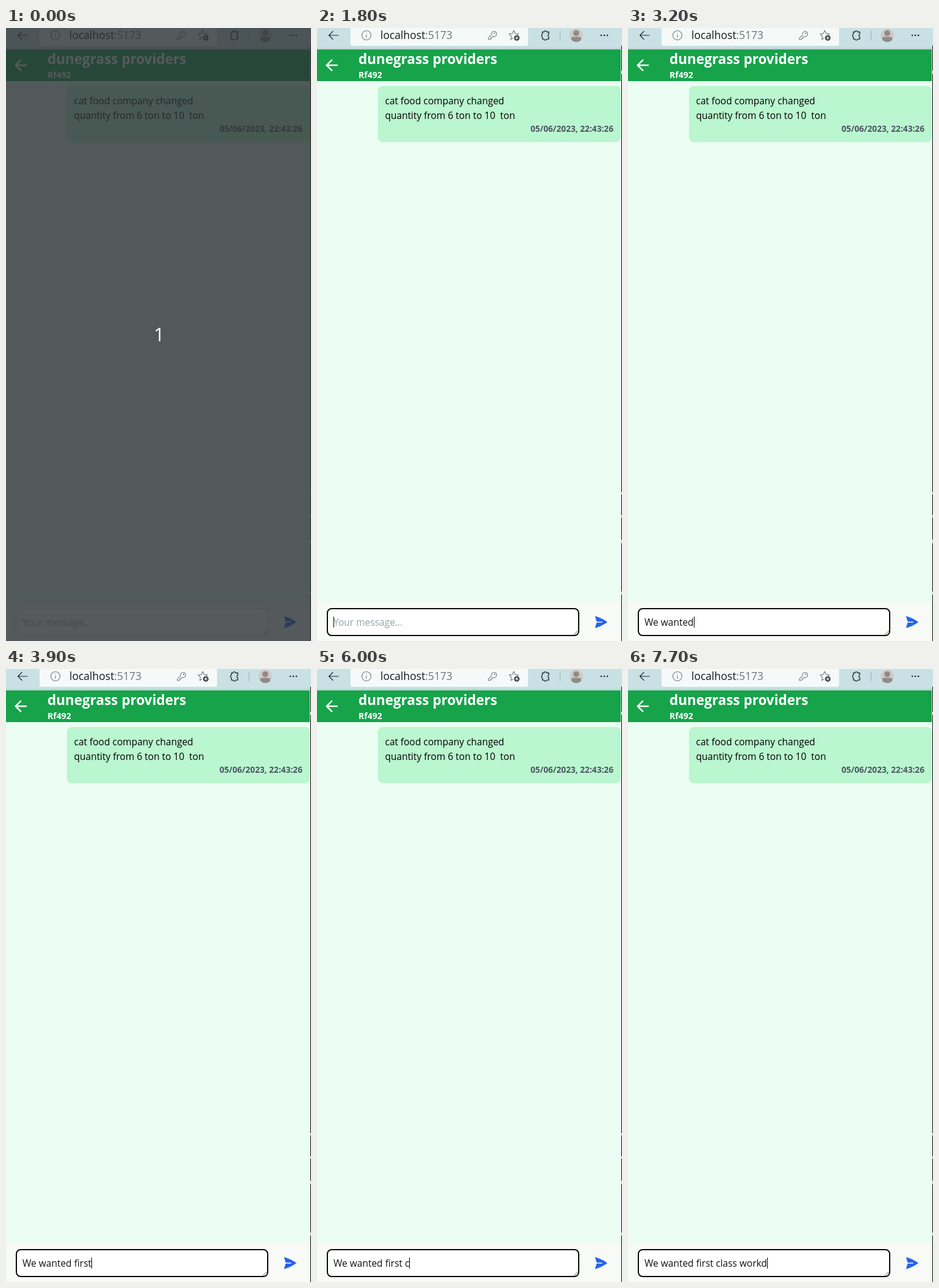
An HTML page for the animation above (8 s loop, 500x1004 px).

```html
<!DOCTYPE html>
<html lang="en">
<head>
<meta charset="utf-8">
<title>Chat</title>
<style>
  html, body { margin: 0; width: 100%; height: 100%; overflow: hidden; }
  svg { display: block; width: 500px; height: 1004px; }
  text { font: 15.5px "Open Sans", "Noto Sans", sans-serif; white-space: pre; }
  .url { font-size: 17.5px; }
  .title { font-size: 22.5px; font-weight: 700; }
  .code { font-size: 14px; font-weight: 700; }
  .date { font-size: 13.7px; font-weight: 700; }
  .count { font-size: 31px; text-anchor: middle; }
  .line { fill: none; stroke-linecap: round; stroke-linejoin: round; }
</style>
</head>
<body>
<svg viewBox="0 0 500 1004">
  <rect width="500" height="1004" fill="#ecfdf3"/>

  <!-- browser bar -->
  <rect width="500" height="35" fill="#c9e1e4"/>
  <path d="M55 0H346V26a3 3 0 0 1-3 3H58a3 3 0 0 1-3-3Z" fill="#f5faf9"/>
  <rect y="33" width="500" height="1" fill="#a9bcc0"/>
  <rect y="34" width="500" height="1" fill="#e3eeee"/>
  <path class="line" d="M35 12H19.5M26 5.5L19.5 12l6.5 6.5" stroke="#20282a" stroke-width="1.2"/>
  <g class="line" stroke="#747c7e" stroke-width="1.1">
    <circle cx="81" cy="12" r="7.5"/>
    <path d="M81 11v4.5M81 8.3v.2"/>
    <path d="M286.2 11.2a4.3 4.3 0 1 1 2.8 2.7L286.5 15.2V17H284.5V18.8H281V16.3Z"/>
    <circle cx="291" cy="8.7" r=".6"/>
    <path d="M321 16.8l-3.3 2 1-5.3-3.7-3.7 5.2-.7L322.5 4l2.3 5.1 5.4.7-2 2"/>
  </g>
  <text class="url" x="104" y="18" fill="#151b1c">localhost<tspan fill="#6f7778">:5173</tspan></text>
  <circle cx="327.5" cy="16.3" r="4.6" fill="#4a5052"/>
  <path d="M325 16.3h5M327.5 13.8v5" stroke="#fff"/>
  <path class="line" d="M369.5 6.5h2.5a2.3 2.3 0 0 1 4.5 0h3.5v3.7a2 2 0 0 0 0 3.9v4h-3.5a2.3 2.3 0 0 1-4.5 0h-2.5v-3.7a2.2 2.2 0 0 1 0-4.2Z" stroke="#20282a" stroke-width="1.3"/>
  <path d="M398.5 4V20" stroke="#9fb1b4"/>
  <circle cx="425" cy="12" r="11" fill="#cfcac6"/>
  <circle cx="425" cy="8.5" r="4.8" fill="#918b87"/>
  <path d="M417 19.5v-2.5q0-2.5 2.5-2.5h11q2.5 0 2.5 2.5v2.5a11 11 0 0 1-16 0Z" fill="#918b87"/>
  <g fill="#20282a">
    <circle cx="466" cy="12" r="1.3"/><circle cx="471" cy="12" r="1.3"/><circle cx="476" cy="12" r="1.3"/>
  </g>

  <!-- chat header -->
  <rect y="35" width="499" height="52" fill="#16a34a"/>
  <g fill="#fff">
    <path transform="translate(9 46) scale(1.25)" d="M20 11H7.83l5.59-5.59L12 4l-8 8 8 8 1.41-1.41L7.83 13H20Z"/>
    <text class="title" x="68" y="59">dunegrass providers</text>
    <text class="code" x="68" y="82">Rf492</text>
  </g>

  <!-- message -->
  <rect x="100" y="95" width="398" height="92" rx="8" fill="#baf6cf"/>
  <text x="111.5" y="125">cat food company changed</text>
  <text x="111.5" y="149">quantity from 6 ton to 10  ton</text>
  <text class="date" x="486" y="170" text-anchor="end" fill="#4b5563">05/06/2023, 22:43:26</text>

  <!-- composer -->
  <rect y="941" width="499" height="63" fill="#f8faf8"/>
  <rect id="box" fill="#fff"/>
  <path class="line" d="M421.5 993.5l7-7M426 993.5l2.5-2.5" stroke="#555" stroke-width=".9"/>
  <text id="hint" x="27" y="979" fill="#94a3a8">Your message...</text>
  <text id="typed" x="27" y="979" fill="#111"></text>
  <rect id="caret" y="964" width="1" height="18"/>
  <path transform="translate(453.5 961)" fill="#2563eb" d="M3.5 2.4a.75.75 0 0 0-.95.95L5 11.25H13.5a.75.75 0 0 1 0 1.5H5L2.55 20.65a.75.75 0 0 0 .95.95A60.5 60.5 0 0 0 21.9 12.6a.75.75 0 0 0 0-1.2A60.5 60.5 0 0 0 3.5 2.4Z"/>

  <!-- window edge -->
  <rect x="498" y="35" width="1" height="969" fill="#dfeee6"/>
  <path d="M499.5 29V1004" stroke="#0b0d0d"/>
  <path d="M499.5 70v5M499.5 760v4M499.5 798v4M499.5 838v6M499.5 923v5" stroke="#c8cccb"/>

  <g id="veil">
    <rect width="500" height="1004" fill="#2c3135" opacity=".8"/>
    <text class="count" x="251" y="513" fill="#fff">1</text>
  </g>
</svg>
<script>
const LOOP = 8000, VEIL_END = 100, FOCUS = 600, KEY_GAP = 100, TEXT_X = 27;

// Runs of keys, one per 100 ms: "<" deletes, "~" deletes with the caret hidden,
// "+" and "-" show and hide the caret.
const runs = [
  [600, "+"], [1200, "-"], [1800, "+"],
  [2000, "W"], [2200, "e"], [2400, " "], [2600, "wa"], [2900, "nted"],
  [3400, " first"], [4100, " ca"], [4500, "l"], [4800, "a"],
  [5400, "<<-"], [5800, "~"], [6000, "+la"],
  [6500, "ss"], [6800, " w"], [7200, "or"], [7500, "k"], [7700, "d"]
];

const $ = id => document.getElementById(id);
const [box, hint, typed, caret, veil] = ["box", "hint", "typed", "caret", "veil"].map($);

function stateAt(ms) {
  let text = "", blink = false;
  for (const [start, keys] of runs) {
    [...keys].forEach((key, i) => {
      if (ms < start + i * KEY_GAP) return;
      blink = !"-~".includes(key);
      if ("<~".includes(key)) text = text.slice(0, -1);
      else if (!"+-".includes(key)) text += key;
    });
  }
  return { text, blink };
}

function setBox(focused) {
  const w = focused ? 2 : 1;
  const attrs = {
    x: 16 + w / 2, y: 950 + w / 2, width: 414 - w, height: 46 - w,
    rx: 8 - w / 2, stroke: focused ? "#0a0a0a" : "#cdd2d4", "stroke-width": w
  };
  for (const name in attrs) box.setAttribute(name, attrs[name]);
}

const show = (el, on) => { el.style.display = on ? "" : "none"; };

function draw(ms) {
  const { text, blink } = stateAt(ms);
  show(veil, ms < VEIL_END);
  setBox(ms >= FOCUS);
  show(hint, !text);
  if (typed.textContent !== text) typed.textContent = text;
  show(caret, blink);
  caret.setAttribute("x", Math.round(TEXT_X + (text ? typed.getComputedTextLength() : 0)));
}

const origin = performance.now();
function tick() {
  draw((performance.now() - origin) % LOOP);
  requestAnimationFrame(tick);
}
tick();
</script>
</body>
</html>
```
